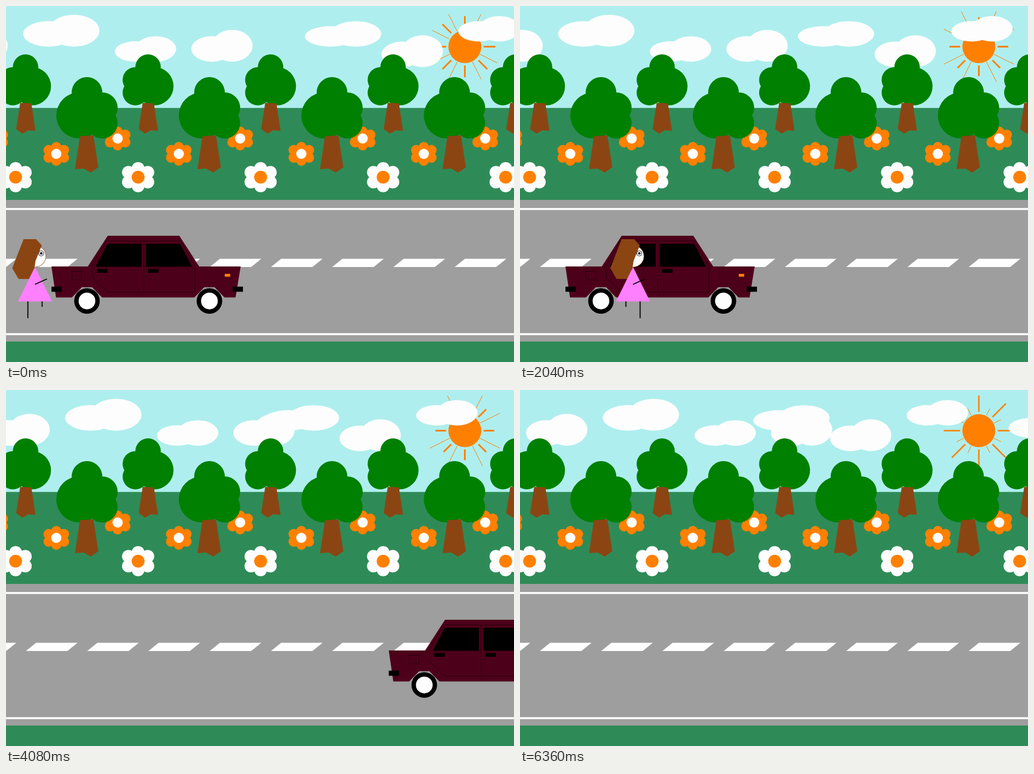
An HTML page with a canvas for the animation above (6.48 s loop, 894 by 626 pixels).

```html
<!DOCTYPE html>
<html lang="en">
<head>
<meta charset="utf-8">
<title>Girl and car</title>
<style>
  html, body { margin: 0; width: 100%; height: 100%; overflow: hidden; }
  canvas { display: block; }
</style>
</head>
<body>
<canvas id="stage" width="894" height="626"></canvas>
<script>
const ctx = document.getElementById('stage').getContext('2d');
const STEP = 120, LOOP = 6480, TILE = 215.6, DEPART = 26;
const SKY = '#afeeee', GRASS = '#2e8b57', ROAD = '#9e9e9e', WHITE = '#fdfdfd';
const ORANGE = '#ff8000', LEAF = '#008000', BROWN = '#8b4513', PINK = '#ff80ff';
const PAINT = '#4d001a', SEAM = '#26000d', BLACK = '#000';

function rect(x, y, w, h, color) {
  ctx.fillStyle = color;
  ctx.fillRect(x, y, w, h);
}

function oval(x, y, rx, ry, color) {
  ctx.fillStyle = color;
  ctx.beginPath();
  ctx.ellipse(x, y, rx, ry, 0, 0, 2 * Math.PI);
  ctx.fill();
}

function disc(x, y, r, color) { oval(x, y, r, r, color); }

function trace(points) {
  ctx.beginPath();
  for (let i = 0; i < points.length; i += 2) ctx.lineTo(points[i], points[i + 1]);
}

function poly(points, color) {
  trace(points);
  ctx.fillStyle = color;
  ctx.fill();
}

function line(points, color, width) {
  trace(points);
  ctx.strokeStyle = color;
  ctx.lineWidth = width;
  ctx.stroke();
}

function place(x, y, sx, sy, draw) {
  ctx.save();
  ctx.translate(x, y);
  ctx.scale(sx, sy);
  draw();
  ctx.restore();
}

function tiled(draw) {
  for (let i = -1; i < 5; i++) place(i * TILE, 0, 1, 1, draw);
}

// Long rays pulse about every 16 steps; thin rays grow as the long ones shrink
function sun(k) {
  const wave = Math.cos(2 * Math.PI * (k * 0.0628 - 0.6));
  const long = 63.5 + 12 * wave;
  const thin = 35.3 - 27 * wave;
  const width = 2.5 - wave / 2;
  ctx.save();
  ctx.translate(807.5, 71.5);
  for (let i = 0; i < 4; i++) {
    line([33, 0, long, 0], ORANGE, width);
    line([24, 24, long - 14.3, long - 14.3], ORANGE, width);
    if (thin > 27) {
      line([27, 13.5, thin, thin / 2], ORANGE, 1);
      line([13.5, 27, thin / 2, thin], ORANGE, 1);
    }
    ctx.rotate(Math.PI / 2);
  }
  disc(0, 0, 29, ORANGE);
  ctx.restore();
}

function cloud(left, y, rx, ry) {
  oval(left + rx, y, rx, ry, WHITE);
  oval(left + 2 * rx, y - ry / 4, rx, ry * 1.25, WHITE);
}

function clouds(shift) {
  const small = 36, large = 44.8, flat = 17.9, tall = 22.4;
  cloud(shift - 105, 75.5, small, tall);
  cloud(shift + 30, 49, large, tall);
  cloud(shift + 191.5, 80, small, flat);
  cloud(shift + 326, 75.5, small, tall);
  cloud(526 - shift, 53.5, large, flat);
  cloud(661 - shift, 85, small, tall);
  cloud(796 - shift, 44.5, small, flat);
  cloud(975 - shift, 66.5, large, flat);
}

function flower(x, y, size, petal, core) {
  place(x, y, size, size, () => {
    for (const side of [-1, 1]) {
      disc(0, side * 12, 9, petal);
      for (const dy of [-6.7, 6.7]) disc(side * 13.5, dy, 9, petal);
    }
    disc(0, 0, 9, core);
  });
}

// One unit is the radius of the crown's top lobe
function tree(x, y, unit, flip) {
  place(x, y, unit * flip, unit, () => {
    disc(0, 0, 1, LEAF);
    disc(-1, 1, 1, LEAF);
    disc(-1, 2, 1, LEAF);
    disc(0.5, 1.5, 1.5, LEAF);
    poly([-0.42, 2.8, 0.46, 2.85, 0.78, 5, 0.22, 4.95, -0.24, 5.22, -0.74, 4.87], BROWN);
  });
}

function meadow() {
  rect(0, 179.3, 894, 447, GRASS);
  tiled(() => {
    flower(88.5, 260, 1, ORANGE, WHITE);
    flower(196.5, 233, 1, ORANGE, WHITE);
    flower(232.5, 301, 1.26, WHITE, ORANGE);
  });
  tiled(() => tree(250, 107.5, 22.4, 1));
  tiled(() => tree(142.5, 152, 27, -1));
}

function road() {
  rect(0, 341, 894, 249, ROAD);
  for (const y of [355.2, 575.3]) rect(0, y, 894, 3.5, WHITE);
  for (let i = -1; i < 8; i++) {
    const x = 35 + i * TILE / 2;
    poly([x + 18, 444.5, x + 91, 444.5, x + 73, 459, x, 459], WHITE);
  }
}

function car() {
  poly([80, 458, 144, 458, 179, 404, 305, 404, 340, 458, 413, 458,
    404, 512.5, 88, 512.5], PAINT);
  for (const x of [142.5, 358]) {
    poly([x - 27, 513, x - 9, 494.5, x + 9, 494.5, x + 27, 513], ROAD);
    disc(x, 518.7, 22.5, BLACK);
    disc(x, 518.7, 14.7, WHITE);
  }
  line([151.5, 458, 176, 413, 308, 413, 332.5, 458, 332.5, 503, 180, 503,
    152, 478, 151.5, 458], SEAM, 1);
  line([242.5, 413, 242.5, 503], SEAM, 1);
  ctx.strokeRect(116, 466.5, 17, 15);
  for (const side of [-1, 1]) {
    place(242.5, 0, side, 1, () =>
      poly([3.8, 418, 64, 418, 85, 458.5, 3.8, 458.5], BLACK));
  }
  for (const x of [160, 250]) rect(x, 462.5, 18.5, 6.5, BLACK);
  for (const x of [80, 399]) rect(x, 493.5, 18, 9, BLACK);
  rect(385, 471, 9.5, 5, ORANGE);
}

function girl(swap) {
  disc(51, 440, 19.5, BROWN);
  disc(51, 440, 18.8, WHITE);
  disc(62, 435, 4.8, BLACK);
  disc(62, 435, 3.9, WHITE);
  disc(62, 435, 2.3, '#202040');
  poly([31, 410, 53, 410, 63, 421, 52, 448, 50, 461, 41, 480, 22, 480, 11, 461], BROWN);
  line([38.5, 519, 38.5, swap ? 529 : 549], BLACK, 1.8);
  line([63.5, 519, 63.5, swap ? 549 : 529], BLACK, 1.8);
  poly([51, 459, 81, 519.5, 21, 519.5], PINK);
  line([51, 489.5, 72, 480], BLACK, 1.8);
}

function scene(k) {
  rect(0, 0, 894, 180, SKY);
  sun(k);
  clouds(k * 2.18);
  meadow();
  road();
  place(Math.max(0, k - DEPART) * 74.2, 0, 1, 1, car);
  if (k < DEPART) {
    place(k * 8.7, 0, 1, 1, () => girl(Math.floor(k * STEP / 350) % 2));
  }
}

function tick(now) {
  scene(Math.floor(now % LOOP / STEP));
  requestAnimationFrame(tick);
}

scene(0);
requestAnimationFrame(tick);
</script>
</body>
</html>
```
